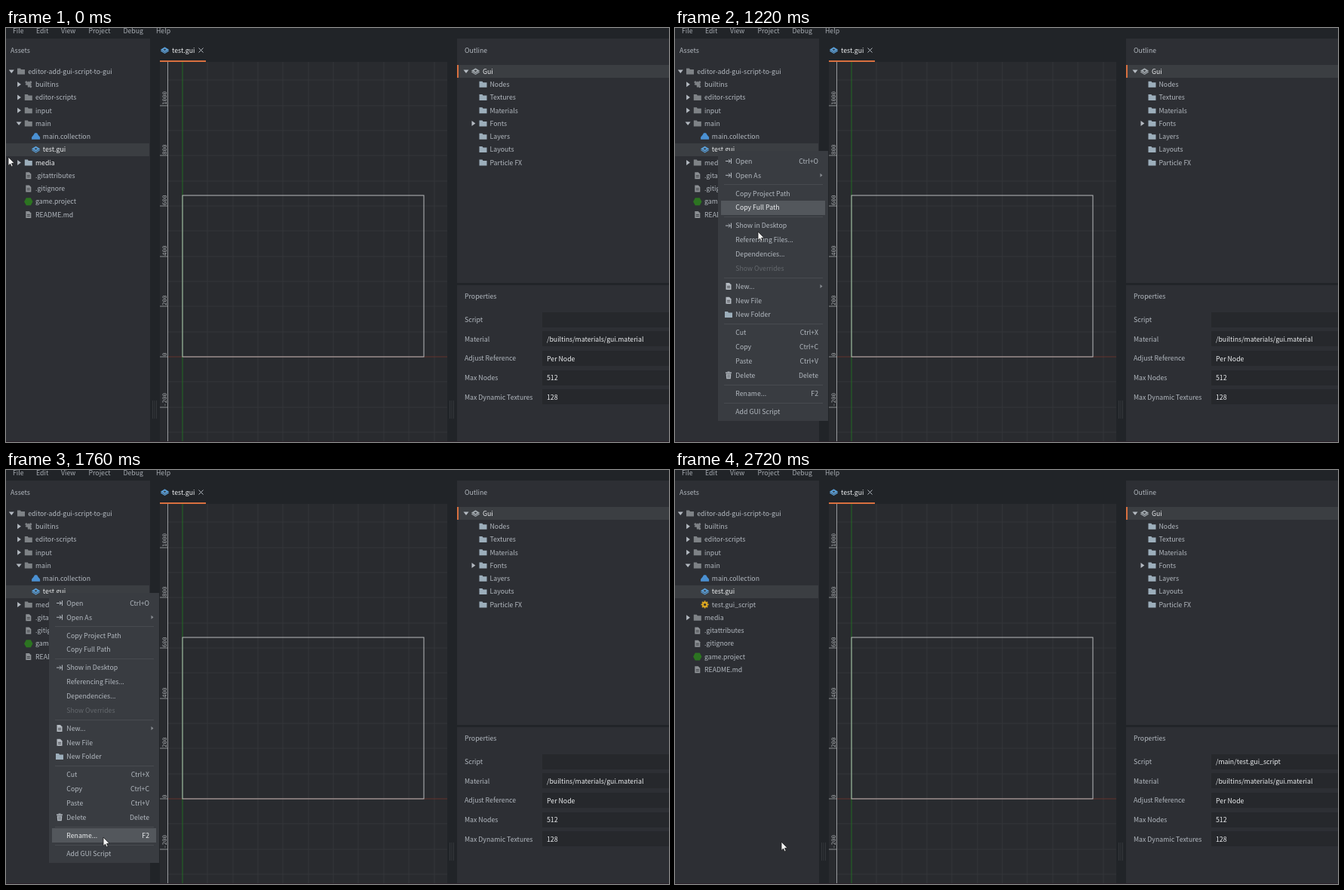
Recreate the animation shown at these times as an HTML page with a canvas. Size 879 px wide and 549 px high, loop 2.79 s.

```html
<!DOCTYPE html>
<html lang="en">
<head>
<meta charset="utf-8">
<title>Add GUI script</title>
<style>
html, body { margin: 0; width: 100%; height: 100%; overflow: hidden; background: #212428; }
canvas { display: block; }
</style>
</head>
<body>
<canvas id="stage" width="879" height="549"></canvas>
<script>
const ctx = document.getElementById('stage').getContext('2d');
const LOOP = 2790, STEPS = 41, LAST = STEPS - 1;
const MENU_OPEN = 13, MENU_CLOSE = 33, SCRIPT_ADDED = 37;
const ROW = 17.27, FIRST_ROW = 57.5;
const SANS = '8.75px "Noto Sans CJK JP", "Noto Sans CJK SC", "Noto Sans CJK", sans-serif';
const MONO = '7.5px "DejaVu Sans Mono", monospace';
const C = {
  chrome: '#212428', panel: '#2d2f34', view: '#292b2f', grid: '#34373a', row: '#3b3e42',
  menu: '#393c41', hover: '#53575c', rule: '#484b50', field: '#26282c',
  text: '#b4bac1', bright: '#eceef0', dim: '#64686d', folder: '#7e8286', steel: '#9caebb',
  blue: '#5a9fd8', green: '#2c7421', gold: '#d9a520', orange: '#d9703f'
};

// Pointer tip: step, x, y
const pointerPath = [
  [0, 3, 171], [2, 18, 165], [5, 46, 157], [8, 57, 155], [12, 57, 163], [15, 57, 163],
  [16, 72, 188], [17, 93, 234], [18, 110, 270], [20, 119, 350], [22, 123, 417],
  [23, 125, 437], [25, 129, 478], [26, 129, 487], [28, 128, 498], [31, 127, 503],
  [35, 127, 503], [40, 141, 493]
];

const menuItems = [];
const separators = [];
let menuY = 176.5;
for (const group of [
  [['Open', 'Ctrl+O', 'enter'], ['Open As', '>', 'enter']],
  [['Copy Project Path'], ['Copy Full Path']],
  [['Show in Desktop', '', 'enter'], ['Referencing Files...'], ['Dependencies...'], ['Show Overrides']],
  [['New...', '>', 'file'], ['New File', '', 'file'], ['New Folder', '', 'folder']],
  [['Cut', 'Ctrl+X'], ['Copy', 'Ctrl+C'], ['Paste', 'Ctrl+V'], ['Delete', 'Delete', 'trash']],
  [['Rename...', 'F2']],
  [['Add GUI Script']]
]) {
  for (const [label, key = '', icon] of group) {
    menuItems.push({ label, key, icon, y: menuY });
    menuY += 18.8;
  }
  separators.push(menuY - 6.8);
  menuY += 5.2;
}
separators.pop();

function box(x, y, w, h, color) {
  ctx.fillStyle = color;
  ctx.fillRect(x, y, w, h);
}

function text(str, x, y, color = C.text, align = 'left') {
  ctx.font = SANS;
  ctx.textAlign = align;
  ctx.fillStyle = color;
  ctx.fillText(str, x, y + 3.2);
}

function poly(color, ...xy) {
  ctx.fillStyle = color;
  ctx.beginPath();
  for (let i = 0; i < xy.length; i += 2) ctx.lineTo(xy[i], xy[i + 1]);
  ctx.fill();
}

function disc(x, y, r, color) {
  ctx.fillStyle = color;
  ctx.beginPath();
  ctx.arc(x, y, r, 0, 7);
  ctx.fill();
}

function line(color, width, ...xy) {
  ctx.strokeStyle = color;
  ctx.lineWidth = width;
  ctx.beginPath();
  for (let i = 0; i < xy.length; i += 2) ctx.lineTo(xy[i], xy[i + 1]);
  ctx.stroke();
}

function arrow(x, y, open) {
  if (open) poly(C.text, x - 3.5, y - 2, x + 3.5, y - 2, x, y + 2.5);
  else poly(C.text, x - 2, y - 3.5, x + 2.8, y, x - 2, y + 3.5);
}

// Icons are centred on x, y
const icons = {
  folder(x, y, color) {
    poly(color, x - 5, y - 4, x - 1, y - 4, x, y - 2.5, x + 5, y - 2.5, x + 5, y + 4, x - 5, y + 4);
  },
  file(x, y, color) {
    poly(color, x - 3.5, y - 4.5, x + 1, y - 4.5, x + 3.5, y - 2, x + 3.5, y + 4.5, x - 3.5, y + 4.5);
    for (const dy of [-0.5, 1.5]) box(x - 2, y + dy, 4, 0.8, C.panel);
  },
  puzzle(x, y, color) {
    ctx.save();
    ctx.translate(x, y);
    ctx.rotate(Math.PI / 4);
    box(-3, -3, 6, 6, color);
    for (const [dx, dy] of [[4, 0], [-4, 0], [0, -4]]) disc(dx, dy, 1.6, color);
    disc(0, 3, 1.3, C.panel);
    ctx.restore();
  },
  collection(x, y) {
    poly('#4a90d2', x - 3, y - 2, x - 1.5, y - 4.5, x + 1.5, y - 4.5, x + 3, y - 2,
      x + 5.5, y + 1, x + 5.5, y + 4, x - 5.5, y + 4, x - 5.5, y + 1);
  },
  gui(x, y, color) {
    poly(color, x - 5.7, y + 1, x, y - 2, x + 5.7, y + 1, x, y + 4.5);
    poly(C.row, x - 5.7, y - 0.4, x + 5.7, y - 0.4, x, y + 3.2);
    poly(color, x - 5.7, y - 0.8, x, y - 4.3, x + 5.7, y - 0.8, x, y + 2.4);
    poly(C.row, x - 2, y - 0.8, x, y - 2, x + 2, y - 0.8, x, y + 0.4);
  },
  project(x, y) {
    poly(C.green, x - 5.7, y, x - 3, y - 5, x + 3, y - 5, x + 5.7, y, x + 3, y + 5, x - 3, y + 5);
  },
  gear(x, y) {
    for (let i = 0; i < 8; i++) {
      const a = i * Math.PI / 4;
      line(C.gold, 2, x, y, x + 5 * Math.cos(a), y + 5 * Math.sin(a));
    }
    disc(x, y, 3.7, C.gold);
    disc(x, y, 1.5, C.panel);
  },
  enter(x, y, color) {
    line(color, 1, x - 4, y, x + 2, y);
    line(color, 1, x, y - 2.5, x + 2.3, y, x, y + 2.5);
    line(color, 1, x + 3.5, y - 3.5, x + 3.5, y + 3.5);
  },
  trash(x, y, color) {
    box(x - 1.5, y - 5, 3, 1, color);
    box(x - 4, y - 4, 8, 1.4, color);
    poly(color, x - 3.3, y - 2, x + 3.3, y - 2, x + 2.8, y + 4.7, x - 2.8, y + 4.7);
    for (const dx of [-1.3, 0.7]) box(x + dx, y - 1, 0.7, 4.5, C.menu);
  }
};

function drawAssets(step) {
  box(0, 14, 191, 535, C.panel);
  text('Assets', 6, 30);
  const mediaHover = step < 2;
  const added = step >= SCRIPT_ADDED;
  // depth, label, icon, icon colour, arrow
  const rows = [
    [0, 'editor-add-gui-script-to-gui', 'folder', C.folder, 'open'],
    [1, 'builtins', 'puzzle', C.folder, 'closed'],
    [1, 'editor-scripts', 'folder', C.folder, 'closed'],
    [1, 'input', 'folder', C.folder, 'closed'],
    [1, 'main', 'folder', C.folder, 'open'],
    [2, 'main.collection', 'collection'],
    [2, 'test.gui', 'gui', C.blue],
    ...(added ? [[2, 'test.gui_script', 'gear']] : []),
    [1, 'media', 'folder', mediaHover ? C.steel : C.folder, 'closed'],
    [1, '.gitattributes', 'file', '#8c9094'],
    [1, '.gitignore', 'file', '#8c9094'],
    [1, 'game.project', 'project'],
    [1, 'README.md', 'file', '#8c9094']
  ];
  rows.forEach(([depth, label, icon, color, fold], i) => {
    const y = FIRST_ROW + i * ROW, x = 20 + depth * 9.8;
    const selected = label === 'test.gui';
    if (selected) box(0, 153, 190, 17, C.row);
    if (fold) arrow(x - 12.7, y, fold === 'open');
    icons[icon](x, y, color);
    text(label, x + 9.2, y, selected || label === 'media' && mediaHover ? C.bright : C.text);
  });
}

function drawScene() {
  box(204, 45, 381, 504, C.view);
  const originX = 234, originY = 436, cell = 33.35;
  for (let i = 1; i <= 10; i++) box(Math.round(originX + i * cell) - 0.5, 45, 1, 504, C.grid);
  for (let i = -3; i <= 11; i++) {
    box(215, Math.round(originY - i * cell) - 0.5, 370, 1, i ? C.grid : '#65352f');
  }
  box(originX - 0.5, 45, 1, 504, '#236a25');
  ctx.strokeStyle = '#b9bbbd';
  ctx.lineWidth = 1;
  ctx.strokeRect(234, 222, 320, 214);

  box(214, 45, 1, 504, '#999b9e');
  ctx.font = MONO;
  ctx.textAlign = 'left';
  for (let value = -200; value <= 1000; value += 200) {
    const y = Math.round(originY - value / 100 * cell);
    box(204, y - 0.5, 10, 1, '#8a8d90');
    ctx.save();
    ctx.translate(213, y - 1);
    ctx.rotate(-Math.PI / 2);
    ctx.fillStyle = '#a4a7aa';
    ctx.fillText(value, 0, 0);
    ctx.restore();
  }
  box(204, 43, 61, 2, C.orange);
  icons.gui(210.5, 29.5, C.blue);
  text('test.gui', 220, 29.5, C.bright);
  line(C.text, 1, 255.5, 26.5, 261.5, 32.5);
  line(C.text, 1, 261.5, 26.5, 255.5, 32.5);
  for (const x of [194, 588]) {
    for (const dx of [0, 2.5, 5]) box(x + dx, 494, 1, 24, '#34373b');
  }
}

function drawOutline() {
  box(598, 14, 281, 324, C.panel);
  text('Outline', 608, 30);
  box(598, 49, 281, 17, C.row);
  box(598, 49, 2, 17, C.orange);
  arrow(610, FIRST_ROW, true);
  icons.gui(622.5, FIRST_ROW, '#a0a7ac');
  text('Gui', 632, FIRST_ROW, C.bright);
  ['Nodes', 'Textures', 'Materials', 'Fonts', 'Layers', 'Layouts', 'Particle FX'].forEach((label, i) => {
    const y = FIRST_ROW + (i + 1) * ROW;
    if (label === 'Fonts') arrow(619.5, y);
    icons.folder(632.5, y, C.steel);
    text(label, 641.5, y);
  });
}

function drawProperties(step) {
  box(598, 341, 281, 208, C.panel);
  text('Properties', 608, 355.5);
  [
    ['Script', step >= SCRIPT_ADDED ? '/main/test.gui_script' : ''],
    ['Material', '/builtins/materials/gui.material'],
    ['Adjust Reference', 'Per Node'],
    ['Max Nodes', '512'],
    ['Max Dynamic Textures', '128']
  ].forEach(([label, value], i) => {
    const y = 386.7 + i * 25.65;
    text(label, 608, y);
    box(711, Math.round(y - 10), 168, 20, C.field);
    text(value, 717, y + 0.3, C.bright);
  });
}

function drawMenu(hoverY) {
  box(57, 163, 146, 358, C.menu);
  for (const y of separators) box(65, Math.round(y), 131, 1, C.rule);
  for (const { label, key, icon, y } of menuItems) {
    const disabled = label === 'Show Overrides';
    const hovered = !disabled && Math.abs(hoverY - y) <= 9.4;
    const color = disabled ? C.dim : hovered ? C.bright : C.text;
    if (hovered) box(61, Math.round(y - 9.4), 138, 19, C.hover);
    if (icon) icons[icon](71, y, icon === 'folder' ? C.steel : C.text);
    text(label, 80.3, y, color);
    if (key === '>') poly('#888c91', 192.5, y - 2.5, 195.5, y, 192.5, y + 2.5);
    else text(key, 190, y, color, 'right');
  }
}

function pointerAt(step) {
  const i = Math.max(1, pointerPath.findIndex(p => p[0] >= step));
  const [s0, x0, y0] = pointerPath[i - 1], [s1, x1, y1] = pointerPath[i];
  const f = (step - s0) / (s1 - s0);
  return [Math.round(x0 + (x1 - x0) * f), Math.round(y0 + (y1 - y0) * f)];
}

function drawPointer(x, y) {
  const shape = [0, 0, 0, 11.5, 2.6, 9.2, 4.4, 13, 6.2, 12.2, 4.6, 8.5, 8, 8.2];
  const xy = shape.map((v, i) => v + (i % 2 ? y : x));
  poly('#f2f2f2', ...xy);
  line('#17181a', 0.8, ...xy, x, y);
}

function draw(step) {
  box(0, 0, 879, 549, C.chrome);
  [['File', 9], ['Edit', 40], ['View', 73], ['Project', 109.5], ['Debug', 155.5], ['Help', 199]]
    .forEach(([label, x]) => text(label, x, 4, '#a7acb2'));
  drawAssets(step);
  drawScene();
  drawOutline();
  drawProperties(step);
  box(0, 548, 879, 1, '#2a2129');
  // The highlight trails the pointer by one step
  if (step >= MENU_OPEN && step < MENU_CLOSE) drawMenu(step > 15 ? pointerAt(step - 1)[1] : 0);
  drawPointer(...pointerAt(step));
}

function frame() {
  const time = performance.now() % LOOP;
  draw(Math.min(LAST, Math.floor((time + 16) / (LOOP / STEPS))));
  requestAnimationFrame(frame);
}
frame();
</script>
</body>
</html>
```
